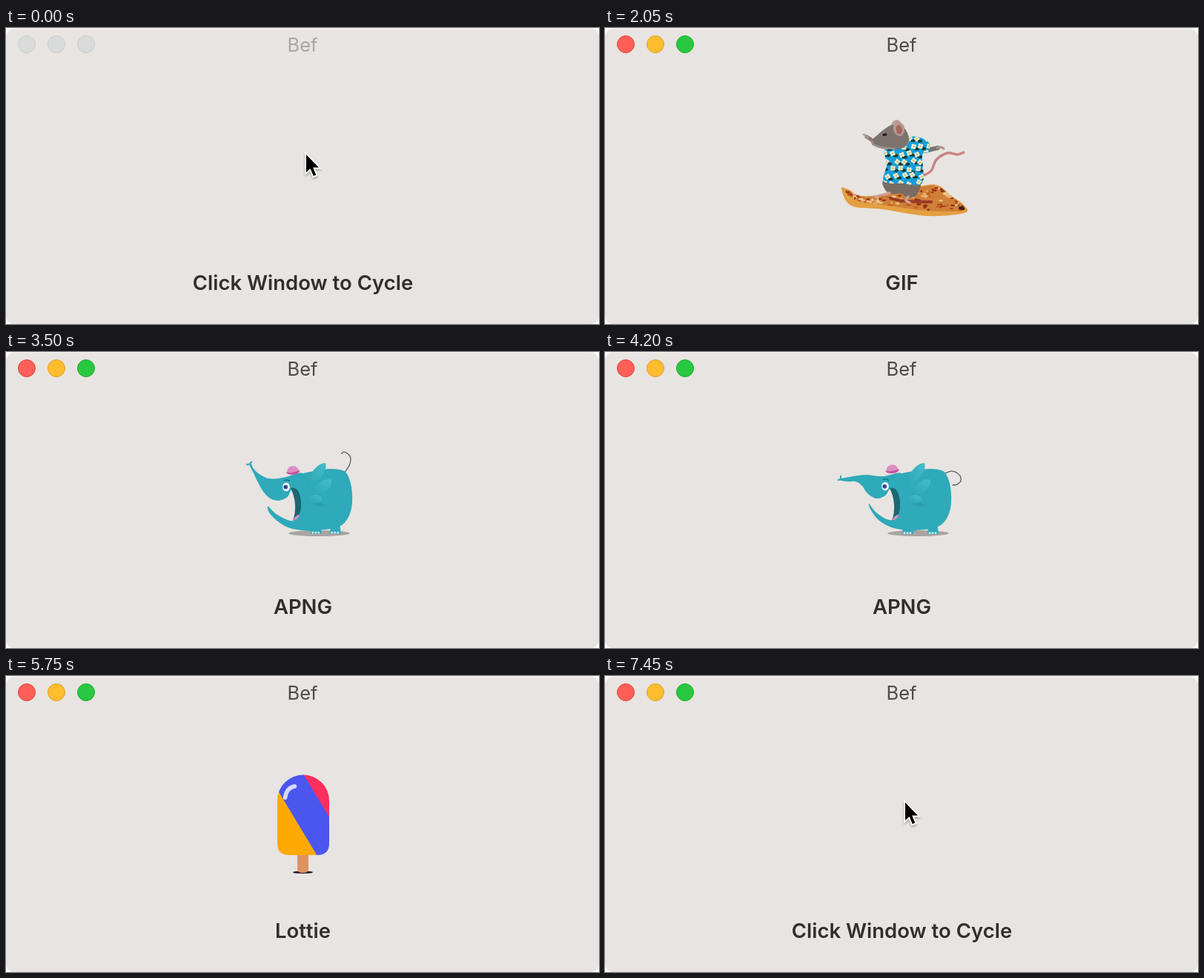
Write an HTML page that moves like this. It is 800 px wide and 400 px high and loops after 8000 ms.

```html
<!DOCTYPE html>
<html lang="en">
<head>
<meta charset="utf-8">
<title>Bef</title>
<style>
html, body { margin: 0; width: 100%; height: 100%; overflow: hidden; background: #fff; }
svg { display: block; width: 800px; height: 400px; }
text { font-family: Inter, "Open Sans", sans-serif; text-anchor: middle; }
#title { font-size: 25.5px; fill: #4d4b49; }
#label { font-size: 27.5px; font-weight: 600; fill: #322e2b; }
.idle #title { fill: #a9a6a4; }
.idle #lights circle { fill: #dadbdb; stroke: #c9cccd; }
</style>
</head>
<body>
<svg id="stage" viewBox="0 0 800 400">
  <defs>
    <clipPath id="popClip"><path d="M366 168.500A35 35 0 0 1 436 168.500V226Q436 242 420 242H382Q366 242 366 226Z"/></clipPath>
    <linearGradient id="feather" x1="0" y1="1" x2="1" y2="0">
      <stop offset=".1" stop-color="#2ca7b6"/><stop offset="1" stop-color="#45bcc9"/>
    </linearGradient>
    <filter id="drop" x="-50%" y="-50%" width="200%" height="200%">
      <feDropShadow dx="0" dy="2" stdDeviation="1.500" flood-opacity=".35"/>
    </filter>
  </defs>
  <rect width="800" height="400" rx="11" fill="#f4f2f0"/>
  <rect y="1.500" width="800" height="398.500" rx="11" fill="#e8e4e1"/>
  <g id="lights">
    <circle cx="28" cy="22" r="11.500" fill="#ff5f57" stroke="#e0443e"/>
    <circle cx="68" cy="22" r="11.500" fill="#febc2e" stroke="#dea123"/>
    <circle cx="108" cy="22" r="11.500" fill="#28c840" stroke="#1aab29"/>
  </g>
  <text id="title" x="400" y="32">Bef</text>
  <text id="label" x="400.500" y="354"></text>

  <g id="cursor" filter="url(#drop)">
    <path d="M405 171V195L410.500 190L414.800 200L418.300 198.500L414.200 188.500H422Z"
      fill="#000" stroke="#fff" stroke-width="3.500" paint-order="stroke"/>
  </g>
  <g id="surfer"></g>
  <g id="elephant"></g>
  <g id="pop">
    <ellipse cx="400.500" cy="265.300" rx="13.500" ry="1.700" fill="#1d1530"/>
    <path d="M393 238H408V261Q408 266 400.500 266Q393 266 393 261Z" fill="#e0925f"/>
    <g clip-path="url(#popClip)"><g id="stripes"></g></g>
    <path d="M376.500 164.500Q378.500 151 389.500 149" fill="none" stroke="#fff" stroke-opacity=".78"
      stroke-width="5.500" stroke-linecap="round"/>
  </g>
</svg>
<script>
const LOOP = 8000;
const $ = id => document.getElementById(id);
const stage = $('stage');

function add(parent, tag, attrs) {
  const el = document.createElementNS('http://www.w3.org/2000/svg', tag);
  for (const k in attrs) el.setAttribute(k, attrs[k]);
  return parent.appendChild(el);
}

const pts = s => s.split(' ').map(p => p.split(',').map(Number));
const lerp = (a, b, u) => a + (b - a) * u;
const mix = (p, q, u) => p.map((a, i) => [lerp(a[0], q[i][0], u), lerp(a[1], q[i][1], u)]);

// Smooth path through all points
function curve(p, closed) {
  const n = p.length;
  const at = i => closed ? p[(i + n) % n] : p[Math.max(0, Math.min(n - 1, i))];
  let d = 'M' + p[0];
  for (let i = 0; i < (closed ? n : n - 1); i++) {
    const [a, b, c, e] = [at(i - 1), at(i), at(i + 1), at(i + 2)];
    d += `C${b[0] + (c[0] - a[0]) / 6} ${b[1] + (c[1] - a[1]) / 6} ` +
         `${c[0] - (e[0] - b[0]) / 6} ${c[1] - (e[1] - b[1]) / 6} ${c[0]} ${c[1]}`;
  }
  return d + (closed ? 'Z' : '');
}

// Each actor holds functions that pose its parts for u = 0..1
function morph(poses, parent, from, to, attrs) {
  const a = pts(from), b = pts(to), closed = !attrs.stroke;
  const el = add(parent, 'path', closed ? attrs
    : { fill: 'none', 'stroke-linecap': 'round', 'stroke-linejoin': 'round', ...attrs });
  poses.push(u => el.setAttribute('d', curve(mix(a, b, u), closed)));
  return el;
}
function slide(poses, el, dx, dy) {
  poses.push(u => el.setAttribute('transform', `translate(${dx * u} ${dy * u})`));
  return el;
}

let seed = 11;
const rnd = () => (seed = (seed * 16807) % 2147483647) / 2147483647;
const pick = list => list[Math.floor(rnd() * list.length)];

function buildSurfer() {
  const poses = [], g = $('surfer');
  const part = (a, b, attrs) => morph(poses, g, a, b, attrs);
  const clip = (id, a, b) => morph(poses, add(g, 'clipPath', { id }), a, b, {});

  part('428,200 440,193 447,178 462,169 475,171 484,168',
       '428,197 440,179 450,169 460,170 463,182 467,195', { stroke: '#c98484', 'stroke-width': 3.4 });

  // Pizza
  part('319,217 330,219 344,227 375,225 415,216 447,212 466,226 485,240 485,250 435,254 375,245 332,240',
       '331,262 338,247 351,236 378,225 415,204 440,197 468,200 495,211 493,221 440,239 385,243 340,263',
       { fill: '#e3a040' });
  const top = ['325,218 345,227 375,226 415,217 447,213 467,227 484,241 482,247 435,247 375,239 345,235 328,226',
               '337,252 352,237 378,226 415,206 440,198 468,201 493,211 488,217 440,232 385,236 355,241 341,254'];
  part(...top, { fill: '#cf7f36' });
  clip('cheese', ...top);
  const cheese = add(g, 'g', { 'clip-path': 'url(#cheese)' });
  const [ta, tb] = top.map(pts);
  for (let k = 0; k < 130; k++) {
    const s = rnd() * 4.99, v = rnd(), i = Math.floor(s), f = s - i;
    const dot = add(cheese, 'ellipse', {
      rx: 1 + rnd() * 2.6, ry: .7 + rnd() * 1.3,
      fill: pick(['#a23c16', '#8f3113', '#efcb92', '#e8b673', '#c2591f'])
    });
    const spot = p => [0, 1].map(c =>
      lerp(lerp(p[i][c], p[i + 1][c], f), lerp(p[11 - i][c], p[10 - i][c], f), v));
    const a = spot(ta), b = spot(tb);
    poses.push(u => {
      dot.setAttribute('cx', lerp(a[0], b[0], u));
      dot.setAttribute('cy', lerp(a[1], b[1], u));
    });
  }
  part('479,243 483,244', '488,214 492,215', { stroke: '#3a2018', 'stroke-width': 4 });
  part('385,230 404,234 440,235', '385,227 405,227 436,224', { stroke: '#9a3a22', 'stroke-width': 4 });

  // Legs, arms, feet
  part('376,206 400,208 425,208 421,225 409,230 400,224 385,224 377,217',
       '380,203 402,206 428,204 424,221 411,225 400,221 388,221 381,215', { fill: '#786c64' });
  part('384,223 376,225 364,228', '392,221 382,224 371,227', { stroke: '#cfa096', 'stroke-width': 3.5 });
  part('409,228 406,233 411,236', '411,223 406,226 396,229', { stroke: '#cfa096', 'stroke-width': 3.5 });
  part('366,157 358,150 353,147', '360,160 352,158 347,158', { stroke: '#857a73', 'stroke-width': 5 });
  part('355,148 351,145 349,144', '349,158 345,158 342,159', { stroke: '#a8978c', 'stroke-width': 2.6 });
  part('432,166 440,164 449,162', '431,160 437,168 435,177', { stroke: '#7d736d', 'stroke-width': 6 });
  part('448,162 453,161 457,163', '436,174 435,178 433,180', { stroke: '#a8948a', 'stroke-width': 3 });

  // Shirt
  const shirt = ['377,165 395,163 408,157 413,147 428,149 438,157 436,168 428,172 428,209 400,210 376,207 380,185',
                 '374,167 390,165 402,157 408,145 422,147 431,154 431,163 428,171 430,202 402,208 379,205 381,185'];
  part(...shirt, { fill: '#159fda' });
  clip('shirt', ...shirt);
  const print = slide(poses, add(add(g, 'g', { 'clip-path': 'url(#shirt)' }), 'g', {}), 0, -2);
  for (let row = 0; row < 7; row++) for (let col = 0; col < 6; col++) {
    const x = 374 + col * 11.5 + (row % 2) * 5 + rnd() * 4, y = 148 + row * 10 + rnd() * 4;
    add(print, 'ellipse', { cx: x + 4, cy: y + 3, rx: 3.6, ry: 2, fill: '#1c3b30' });
    for (let k = 0; k < 4; k++) add(print, 'circle', {
      cx: x + 2.2 * Math.cos(k * 1.57 + row), cy: y + 2.2 * Math.sin(k * 1.57 + row),
      r: 1.8, fill: '#f3edcf'
    });
    add(print, 'circle', { cx: x, cy: y, r: 1, fill: '#c9b23c' });
  }

  // Head
  part('386,134 388,127 394,124 399,128 396,136', '374,135 375,129 380,126 386,129 384,138', { fill: '#b9a59a' });
  part('359,153 367,145 378,136 388,131 402,134 408,142 410,152 404,161 390,164 374,163 363,159',
       '351,158 361,147 371,139 381,134 393,138 400,148 403,157 396,163 382,167 368,166 356,163', { fill: '#7d736d' });
  part('361,157 372,161 390,163', '354,161 366,165 384,166', { stroke: '#9b8f88', 'stroke-width': 2.4 });
  part('391,142 389,133 394,127 402,130 404,139 399,146', '379,142 378,133 382,128 389,131 392,139 387,146',
    { fill: '#b89a8f' });
  part('394,142 393,134 397,131 401,137 399,143', '382,142 381,134 384,132 388,138 386,143', { fill: '#a4665c' });
  part('376,144.500 379,144', '367,149.500 370,149', { stroke: '#1d1a19', 'stroke-width': 2.8 });
  part('360,153 361,155', '353,158 354,160', { stroke: '#b08a82', 'stroke-width': 2.6 });
  return poses;
}

function buildElephant() {
  const poses = [], g = $('elephant'), skin = '#2eaaba';
  const part = (a, b, attrs) => morph(poses, g, a, b, attrs);
  const shape = (d, fill) => add(g, 'path', { d, fill });

  add(g, 'ellipse', { cx: 422.5, cy: 245, rx: 41.5, ry: 4, fill: '#a8a4a2' });

  // The tail swings out in an arc
  const ta = pts('459,164 468,161 478,166 480,174 475,179 469,180');
  const tb = pts('457,162 462,152 461,142 455,136 449,134 445,138');
  const tail = add(g, 'path', { fill: 'none', stroke: '#3b4648', 'stroke-width': 1.1, 'stroke-linecap': 'round' });
  poses.push(u => {
    const bend = Math.sin(Math.PI * u);
    const p = mix(ta, tb, u).map(([x, y], i) => [x + bend * i * 2.6, y - bend * i * 3]);
    tail.setAttribute('d', curve(p, false));
  });

  // Feet with nails
  for (const [x, dx] of [[401, 11], [435, 2]]) {
    const foot = slide(poses, add(g, 'g', {}), dx, -.5);
    add(foot, 'path', { d: `M${x + 2} 228H${x + 13}L${x + 15} 246H${x}Z`, fill: skin });
    for (const i of [3, 7, 11]) add(foot, 'ellipse', { cx: x + i, cy: 244.5, rx: 1.5, ry: 1.5, fill: '#cdeef0' });
  }

  shape('M370 172C385 167 405 163 425 159C440 157 452 158 458 162C466 172 468 190 467 205' +
        'C465 222 458 234 446 237C430 242 405 242 387 236L389 228C393 212 392 196 384 184Z', skin);
  part('356,205 366,217 380,226 396,228 420,230 420,241 400,240 384,236 369,227 359,214',
       '353,209 364,219 380,227 396,229 420,230 420,241 400,241 382,238 366,229 355,218', { fill: skin });
  part('316,172 334,168 352,166 375,168 400,164 402,185 386,184 378,194 366,198 354,191 347,181 338,175 326,175',
       '330,149 342,164 357,172 378,169 400,164 402,185 386,186 380,196 369,201 357,199 346,188 338,172 334,160',
       { fill: skin });
  part('314.500,173 319,172 322,173', '326.500,149.500 330,149 333,153', { stroke: skin, 'stroke-width': 2 });
  part('318,167.500 318,170 320,173', '333,146 331,148 333,152', { stroke: skin, 'stroke-width': 2 });

  shape('M384 184C396 180 399 200 398 210C397 221 392 228 387 228C392 214 391 198 384 184Z', '#1c6772');
  shape('M387.500 228Q389 221 396.500 219.500Q394 227 387.500 228Z', '#d58fc4');

  // Ear feathers
  shape('M404 183C408 166 419 150 431 150C434 158 427 171 412 179Z', 'url(#feather)');
  shape('M411 192C417 179 430 169 439 173C441 182 430 191 415 195Z', 'url(#feather)');
  shape('M407 198C413 191 423 192 427 198C424 205 414 207 407 203Z', 'url(#feather)');
  shape('M413 205Q424 212 432 207Q424 204 424 203Z', '#2a9dac');

  // Eye and hat
  const face = slide(poses, add(g, 'g', {}), 0, 1);
  add(face, 'ellipse', { cx: 378, cy: 181.5, rx: 4.8, ry: 5.8, fill: '#fff' });
  add(face, 'circle', { cx: 377.3, cy: 181.7, r: 3, fill: '#4f5fb4' });
  add(face, 'circle', { cx: 377, cy: 181.5, r: 1.4, fill: '#1f2452' });
  add(face, 'path', { d: 'M375 172.500Q379 171 383 173.500', fill: 'none', stroke: '#1c6772', 'stroke-width': 1.2 });
  const hat = slide(poses, add(g, 'g', {}), -.5, 2);
  add(hat, 'path', { d: 'M379.500 161C379 150 395 149 395.500 160Z', fill: '#dd8fc3' });
  add(hat, 'path', { d: 'M378 160.500Q388 162 397 158Q396 163.500 388 164Q380 164.500 378 160.500Z', fill: '#c9529c' });
  return poses;
}

const BAND = 47.6;
const colors = ['#ff2e5c', '#05dc3c', '#ffa905', '#4a56ee'];
for (let i = -8; i < 8; i++) {
  const x = 313.2 + i * BAND;
  add($('stripes'), 'path', {
    d: `M${x - 48} 120h${BAND + .4}l90 150h-${BAND + .4}z`, fill: colors[(i + 8) % 4]
  });
}

const surfer = buildSurfer(), elephant = buildElephant();
const scenes = [
  [0, 'Click Window to Cycle', 'cursor'],
  [1400, 'GIF', 'surfer'],
  [3200, 'APNG', 'elephant'],
  [5300, 'Lottie', 'pop'],
  [7450, 'Click Window to Cycle', 'cursor']
];
const swing = (t, from, period) => (1 - Math.cos(2 * Math.PI * (t - from) / period)) / 2;

function draw(time) {
  const t = Math.floor(time / 50) * 50;
  const [, label, actor] = scenes.filter(s => s[0] <= t).pop();
  stage.setAttribute('class', t < 50 ? 'idle' : '');
  if ($('label').textContent !== label) $('label').textContent = label;
  for (const id of ['cursor', 'surfer', 'elephant', 'pop'])
    $(id).style.display = id === actor ? '' : 'none';

  if (actor === 'surfer') {
    const u = swing(Math.floor((t - 50) / 100) * 100 + 50, 2050, 1800);
    surfer.forEach(pose => pose(u));
  } else if (actor === 'elephant') {
    const u = swing(t, 4200, 1800);
    elephant.forEach(pose => pose(u));
  } else if (actor === 'pop') {
    const cycle = BAND * 4, shift = (t - 6400) / 2000 * cycle % cycle;
    $('stripes').setAttribute('transform', `translate(${shift} 0)`);
  }
}

const start = performance.now();
function tick() {
  draw((performance.now() - start) % LOOP);
  requestAnimationFrame(tick);
}
tick();
</script>
</body>
</html>
```
